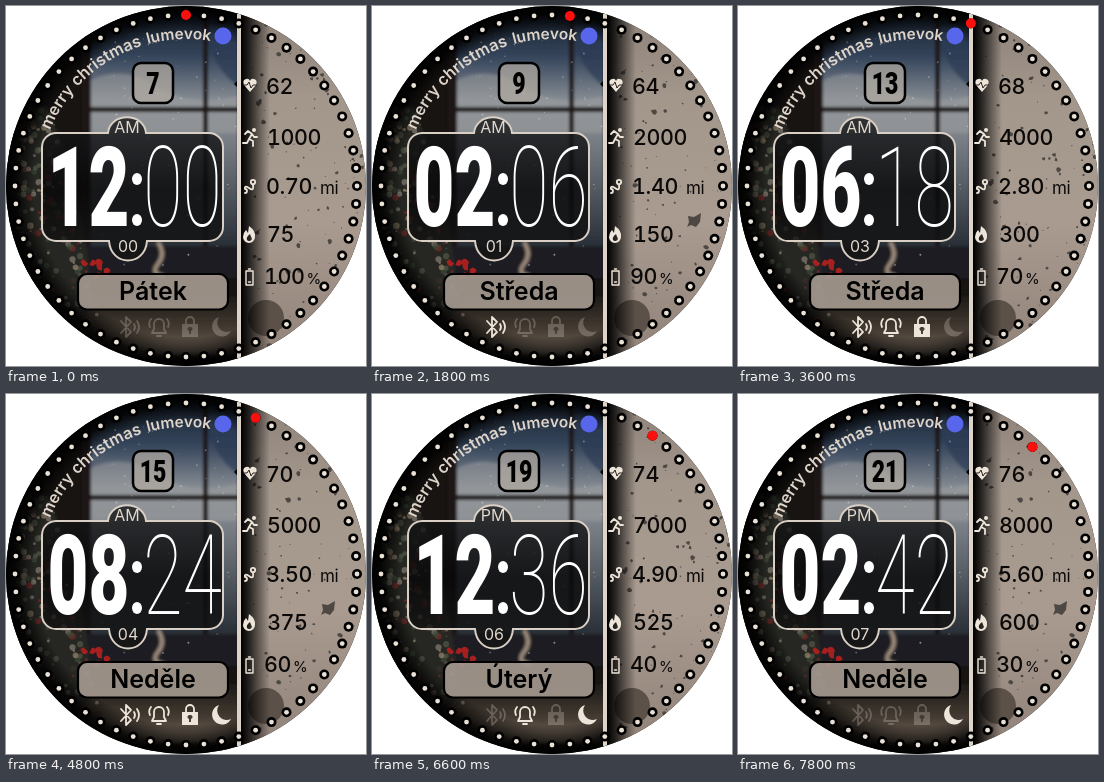
Animation of 360x360 px, one loop 8 s. Source, as an HTML page:

```html
<!DOCTYPE html>
<html lang="cs">
<head>
<meta charset="utf-8">
<title>Watch face</title>
<style>
html, body { margin: 0; width: 100%; height: 100%; overflow: hidden; background: #fff; }
svg { display: block; width: 100vw; height: 100vh; }
text { font-family: Inter, Roboto, sans-serif; }
.arc text { font-size: 16.3px; font-weight: 600; fill: #ddd3c8; }
.time text { font: 900 112px Roboto, sans-serif; text-anchor: middle; fill: #fff; }
.time .thin { font-weight: 250; }
.mid { text-anchor: middle; }
.tab { font-size: 16px; fill: #e2d9ce; }
#rows text { font-size: 21.5px; font-weight: 500; fill: #0b0908; font-variant-numeric: tabular-nums; letter-spacing: -.4px; }
#rows .unit { font-size: 17px; font-weight: 400; }
.line { fill: none; stroke: #eee5da; stroke-width: 1.8; stroke-linecap: round; stroke-linejoin: round; }
.solid { fill: #eee5da; }
</style>
</head>
<body>
<svg viewBox="0 0 360 360">
  <defs>
    <clipPath id="face"><circle cx="180" cy="180" r="180"/></clipPath>
    <clipPath id="side"><path d="M235 0H360V360H235Z"/></clipPath>
    <linearGradient id="sky" x2="0" y2="1">
      <stop offset="0" stop-color="#18202c"/><stop offset=".18" stop-color="#35455b"/>
      <stop offset=".36" stop-color="#858b92"/><stop offset=".5" stop-color="#7d8389"/><stop offset="1" stop-color="#242a33"/>
    </linearGradient>
    <linearGradient id="floor" x2="0" y2="1">
      <stop offset="0" stop-color="#1d1917"/><stop offset=".5" stop-color="#3f372f"/><stop offset="1" stop-color="#74675a"/>
    </linearGradient>
    <linearGradient id="tan" x2="0" y2="1">
      <stop offset="0" stop-color="#8c8077"/><stop offset=".25" stop-color="#a3978c"/>
      <stop offset=".6" stop-color="#a99b90"/><stop offset="1" stop-color="#8f8177"/>
    </linearGradient>
    <linearGradient id="shade">
      <stop offset="0"/><stop offset=".3" stop-opacity=".75"/><stop offset="1" stop-opacity="0"/>
    </linearGradient>
    <linearGradient id="glass" x2="0" y2="1">
      <stop offset="0" stop-color="#17181a"/><stop offset=".5" stop-color="#060607"/><stop offset="1" stop-color="#161616"/>
    </linearGradient>
    <radialGradient id="rim" gradientUnits="userSpaceOnUse" cx="180" cy="180" r="180">
      <stop offset=".84" stop-opacity="0"/><stop offset=".95" stop-opacity=".85"/><stop offset="1"/>
    </radialGradient>
    <filter id="soft" x="-20%" y="-20%" width="140%" height="140%"><feGaussianBlur stdDeviation="1.5"/></filter>
    <path id="curve" d="M33 180A147 147 0 0 1 327 180"/>
  </defs>

  <g clip-path="url(#face)">
    <path fill="#171412" d="M0 0H360V360H0Z"/>
    <g filter="url(#soft)">
      <path fill="url(#sky)" d="M84 8H232V246H84Z"/>
      <path fill="#2b3b54" opacity=".7" d="M203 20H232V80Q215 70 203 40Z"/>
      <path fill="#a3a3a2" opacity=".45" d="M84 75Q115 58 150 80T232 90V127H84Z"/>
      <path fill="#1d1512" d="M76 0H85V260H76ZM197 8H202V250H197ZM84 101H234V106H84Z"/>
      <path fill="#1a1c20" d="M60 240H235V272H60Z"/>
      <path fill="url(#floor)" d="M0 290H235V350H0Z"/>
      <path fill="#262820" d="M40 100L62 150 78 225 88 300 60 330 0 330V130Z"/>
      <path fill="none" stroke="#9b8a7b" stroke-width="4" d="M152 236Q160 248 152 258T158 270"/>
    </g>
    <g id="tree"></g>
    <g id="snow" fill="#dde3ea"></g>
    <path fill="url(#rim)" d="M0 0H235V360H0Z"/>

    <g clip-path="url(#side)">
      <path fill="url(#tan)" d="M235 0H360V360H235Z"/>
      <g id="ash" fill="#4e4844"></g>
      <circle cx="260" cy="312" r="18" fill="#5c5148"/>
      <path fill="url(#shade)" d="M235 0H264V360H235Z"/>
    </g>

    <path d="M233 78L238 73 243 78 238 83ZM228 78L233 73V83ZM233 125L238 130 233 135ZM233 176L238 181 233 186ZM233 223L238 228 233 233ZM233 266L238 271 233 276Z"/>
    <path stroke="#ded3c8" stroke-width="4" d="M233 8V352"/>
    <g id="dots"></g>
    <circle id="red" r="5" fill="#fb1010"/>
  </g>

  <g class="arc">
    <text><textPath href="#curve" startOffset="57">merry christmas</textPath></text>
    <text style="font-size:15.500px"><textPath href="#curve" startOffset="192">lumevok</textPath></text>
    <circle cx="217" cy="30" r="8.500" fill="#5866ec"/>
  </g>

  <rect x="127" y="57" width="40" height="40" rx="8" fill="#aea79f" fill-opacity=".75" stroke="#000" stroke-width="2.500"/>
  <g transform="translate(147 88) scale(.72 1)">
    <text id="date" class="mid" style="font:800 32px Roboto,sans-serif"></text>
  </g>

  <path fill="url(#glass)" fill-opacity=".8" stroke="#d9cfc4" stroke-width="2"
    d="M50 127H102C104 106 138 106 140 127H203A14 14 0 0 1 217 141V221A14 14 0 0 1 203 235H141C139 261 105 261 103 235H50A14 14 0 0 1 36 221V141A14 14 0 0 1 50 127Z"/>
  <text id="half" class="mid tab" x="121" y="127"></text>
  <text id="sec" class="mid tab" x="122" y="246"></text>
  <g class="time">
    <g transform="translate(82.500 220) scale(.63 1)"><text id="hour"></text></g>
    <g fill="#fff"><ellipse cx="131" cy="173" rx="5" ry="6"/><ellipse cx="131" cy="214" rx="5" ry="6"/></g>
    <g transform="translate(176.500 220) scale(.64 1)"><text id="min" class="thin"></text></g>
  </g>

  <rect x="72" y="268" width="150" height="35.500" rx="9" fill="#a3988f" fill-opacity=".92" stroke="#000" stroke-width="2.200"/>
  <text id="day" class="mid" x="147" y="294" font-size="25" font-weight="600"></text>

  <g id="status">
    <path class="line" d="M115 315L125 326 120 331V311L125 316 115 327M128 318Q130 321 128 324M131 315Q135 321 131 327"/>
    <path class="line" d="M146 327H160L158 323V318A5 5 0 0 0 148 318V323ZM151 330H155M145 313Q142 317 144 321M161 313Q164 317 162 321"/>
    <g>
      <path class="line" d="M180 319V315A4 4 0 0 1 188 315V319"/>
      <path class="solid" fill-rule="evenodd" d="M176 318H192V331H176ZM184 321A2 2 0 0 0 183 325V328H185V325A2 2 0 0 0 184 321Z"/>
    </g>
    <path class="solid" d="M213 311A10 10 0 1 0 225 325A9.500 9.500 0 0 1 213 311Z"/>
  </g>

  <g id="rows">
    <path class="solid" d="M244 86L238 79Q236 74 240 73 243 72 244 75 245 72 248 73 252 74 250 79Z"/>
    <path stroke="#2b211c" fill="none" d="M237 79H241L243 76 245 82 247 79H251"/>
    <circle class="solid" cx="248" cy="124" r="2"/>
    <path class="line" d="M239 128L242 125 246 128 243 133 247 135V140M243 133L241 137H237M246 128L248 131H251"/>
    <path class="line" d="M239 187A2 2 0 1 0 239 183Q238 179 243 182 248 186 247 179"/>
    <circle class="line" cx="247" cy="176" r="2.200"/>
    <path class="solid" fill-rule="evenodd" d="M243 220Q250 225 249 231A6 6 0 0 1 237 231Q237 227 240 224L242 227ZM244 228Q240 231 241 234A3 3 0 0 0 246 233Z"/>
    <path class="line" style="stroke-width:1.400px" d="M240 265H247V279H240ZM242.500 263H244.500M242.500 276H244.500"/>
    <text id="pulse" x="260" y="88"></text>
    <text id="steps" x="261" y="139"></text>
    <text id="dist" x="260" y="188"></text>
    <text class="unit" x="314" y="188">mi</text>
    <text id="burn" x="261" y="236"></text>
    <text x="258" y="278"><tspan id="power"></tspan><tspan class="unit" dx="2" style="font-size:15px">%</tspan></text>
  </g>
</svg>

<script>
const $ = id => document.getElementById(id);
const pad = n => String(n).padStart(2, "0");
const days = ["Neděle", "Pondělí", "Úterý", "Středa", "Čtvrtek", "Pátek", "Sobota"];

let seed = 11;
const rnd = (a, b) => {
  seed = seed * 16807 % 2147483647;
  return a + (b - a) * seed / 2147483647;
};
const dot = (x, y, r, extra = "") =>
  `<circle cx="${x.toFixed(1)}" cy="${y.toFixed(1)}" r="${r.toFixed(1)}" ${extra}/>`;
const many = (n, make) => Array.from({ length: n }, (_, i) => make(i)).join("");
const onRing = i => {
  const a = i * Math.PI / 30;
  return [180 + 171 * Math.sin(a), 180 - 171 * Math.cos(a)];
};

// irregular fleck
const fleck = (x, y, r) => `<path d="M${many(7, i => {
  const a = i * Math.PI * 2 / 7, d = r * rnd(.5, 1.2);
  return `${(x + d * Math.cos(a)).toFixed(1)} ${(y + d * Math.sin(a)).toFixed(1)} `;
})}Z"/>`;

const lights = ["#7e2c28", "#3d4a38", "#a08c74", "#565c4c", "#8a8378", "#3a3029"];
$("tree").innerHTML = many(220, i => {
  const y = rnd(100, 325);
  return dot(rnd(8, 45 + (y - 100) * .22), y, rnd(.8, 3.4), `fill="${lights[i % 6]}" opacity=".65"`);
}) + `<g fill="#a5201f">${many(9, () => fleck(rnd(62, 108), rnd(255, 270), 4))}</g>`;

$("snow").innerHTML = many(90, () => dot(rnd(86, 230), rnd(20, 260), rnd(.3, 1), `opacity="${rnd(.2, .65).toFixed(2)}"`));

const flecks = many(140, () => {
  const r = rnd(0, 1);
  return fleck(rnd(246, 358), rnd(0, 400), .6 + 2.4 * r * r * r);
}) + `<path d="M316 370L322 371 329 367 328 376 324 381 319 379 315 381 317 376Z"/>`;
$("ash").innerHTML = `<g>${flecks}</g><g transform="translate(0 -400)">${flecks}</g>`;

$("dots").innerHTML = many(60, i => {
  const [x, y] = onRing(i);
  return dot(x, y, 5) + dot(x, y, 2.4, 'fill="#eae1d6"');
});

function draw(now) {
  const t = now % 8000;
  const k = Math.floor(t / 1000);
  const fall = Math.floor(t / 300) % 10 * 40;
  const date = new Date(2022, k, 7 + 2 * k);
  const texts = {
    hour: pad(2 * k % 12 || 12), min: pad(6 * k), sec: pad(k),
    half: k < 6 ? "AM" : "PM", date: date.getDate(), day: days[date.getDay()],
    pulse: 62 + 2 * k, steps: 1000 * (k + 1), dist: (.7 * (k + 1)).toFixed(2),
    burn: 75 * (k + 1), power: 100 - 10 * k
  };
  for (const id in texts) $(id).textContent = texts[id];

  // bluetooth, alarm, lock, moon: each stays lit for four seconds
  [1, 3, 2, 4].forEach((on, i) =>
    $("status").children[i].setAttribute("opacity", k >= on && k < on + 4 ? 1 : .25));

  const [x, y] = onRing(k);
  $("red").setAttribute("cx", x);
  $("red").setAttribute("cy", y);
  $("ash").setAttribute("transform", `translate(0 ${fall})`);
}

const start = performance.now();
function loop() {
  draw(performance.now() - start);
  requestAnimationFrame(loop);
}
loop();
</script>
</body>
</html>
```
